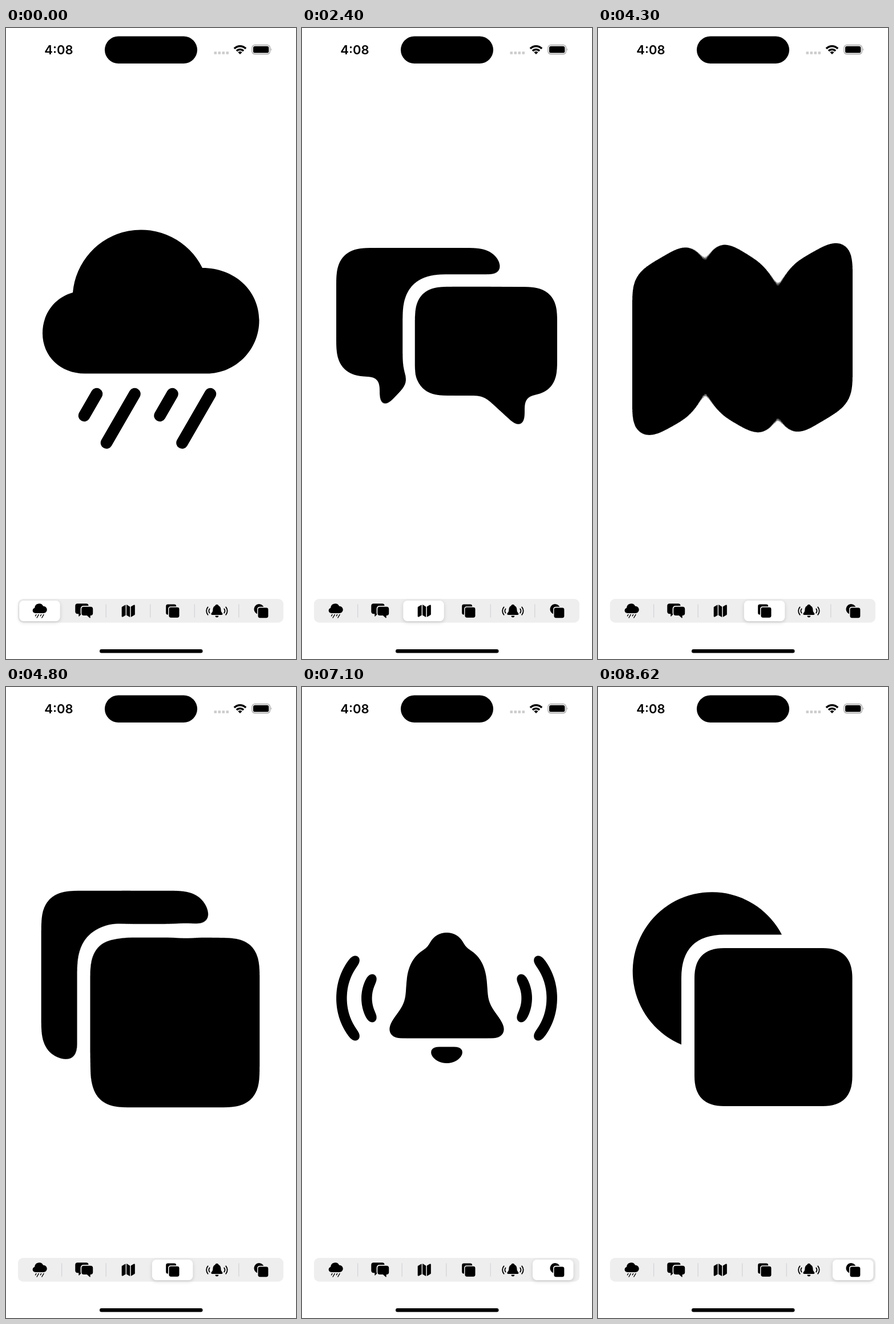
An HTML page for the animation above (8740 ms loop, 508 px wide and 1102 px high).

```html
<!DOCTYPE html>
<html lang="en">
<head>
<meta charset="utf-8">
<title>Icon morph</title>
<style>
  html, body { margin: 0; width: 100%; height: 100%; overflow: hidden; background: #fff; }
  svg { display: block; width: 508px; height: 1102px; }
  .line { fill: none; stroke: #000; stroke-linecap: round; }
  #time { font: 600 22px Inter, "Noto Sans", sans-serif; text-anchor: middle; }
  #pill { fill: #fff; filter: drop-shadow(0 2px 3px rgba(0, 0, 0, .16)); }
</style>
</head>
<body>
<svg viewBox="0 0 508 1102">
  <defs>
    <g id="icon0">
      <path d="M138 603.5C95 603.5 64 573 64 533C64 499 85 471 117 462A120 120 0 0 1 344 419C401 419 443.5 459 443.5 511C443.5 562 402 603.5 352 603.5Z"/>
      <path class="line" stroke-width="20.5" d="M159 639L137 677M225.5 639L176 724.5M291.5 639L269.5 677M358 639L308.5 724.5"/>
    </g>
    <g id="icon1">
      <path d="M112 384H300Q350 384 350 430H247Q176 430 176 501V577Q176 603 186 620L146 662Q136 672 136 656V609H112Q60 609 60 557V436Q60 384 112 384Z"/>
      <path d="M247 452H396Q447 452 447 501V593Q447 642 396 642H390V688Q390 706 376 695L318 642H247Q198 642 198 593V501Q198 452 247 452Z"/>
    </g>
    <g id="icon2">
      <path d="M60 446C60 432 66 426 80 418.5L167 368.5Q175 364 175 373V664Q175 671 169 674L100 712.5C79 724 60 717 60 697Z"/>
      <path d="M200.5 368Q200.5 359 209 363.5L296 416Q302.5 420 302.5 427V716Q302.5 725 295 721L206 671Q200.5 668 200.5 661Z"/>
      <path d="M328 426Q328 418 335 414.5L408 373.5C428 362 446 369 446 391V639C446 651 441 658 430 665L337 719.5Q328 725 328 715Z"/>
    </g>
    <g id="icon3">
      <path d="M358 413.5H202Q124 413.5 124 491.5V652H116.5Q60.5 652 60.5 596V410.5Q60.5 354.5 116.5 354.5H302Q358 354.5 358 410.5Z"/>
      <path d="M204 438H389.5Q445.5 438 445.5 494V679.5Q445.5 735.5 389.5 735.5H204Q148 735.5 148 679.5V494Q148 438 204 438Z"/>
    </g>
    <g id="icon4">
      <path d="M253.5 428.5C237 428.5 225 438 221 455C198 464 185 484 183 516L181.5 538C180 562 160 574 153.5 592C149 604 156 613.5 170 613.5H337C351 613.5 358 604 353.5 592C347 574 327 562 325.5 538L324 516C322 484 309 464 286 455C282 438 270 428.5 253.5 428.5Z"/>
      <path d="M224 637Q223 628.5 231 628.5H276Q284 628.5 283 637C281 649 268 657.5 253.5 657.5S226 649 224 637Z"/>
      <path class="line" stroke-width="18.5" d="M94 476A104 104 0 0 0 94 611M123.5 508A65 65 0 0 0 123.5 579M413 476A104 104 0 0 1 413 611M383.5 508A65 65 0 0 1 383.5 579"/>
    </g>
    <g id="icon5">
      <path d="M322 432.5H222Q146 432.5 146 508V624.5A138.5 138.5 0 1 1 322 432.5Z"/>
      <path d="M221 456H393.5Q445.5 456 445.5 508V680Q445.5 732 393.5 732H221Q169 732 169 680V508Q169 456 221 456Z"/>
    </g>
    <filter id="goo" filterUnits="userSpaceOnUse" x="-40" y="250" width="588" height="600" color-interpolation-filters="sRGB">
      <feGaussianBlur id="blur" stdDeviation="0"/>
      <feComponentTransfer><feFuncA id="threshold" type="linear"/></feComponentTransfer>
    </filter>
  </defs>

  <text id="time" x="92.5" y="46">4:08</text>
  <rect x="173" y="14.5" width="162" height="47.5" rx="23.75"/>
  <path stroke="#ccc" stroke-width="4.6" stroke-dasharray="4.6 2.4" d="M364.5 43.5H390.5"/>
  <g transform="translate(410 46)">
    <path class="line" style="stroke-linecap:butt" stroke-width="3.5" d="M-10.1 -10.1A14.3 14.3 0 0 1 10.1 -10.1M-6.1 -6.1A8.7 8.7 0 0 1 6.1 -6.1"/>
    <path d="M0 0L-3.5 -3.5A5 5 0 0 1 3.5 -3.5Z"/>
  </g>
  <rect x="431" y="29.7" width="31.5" height="16" rx="5" fill="none" stroke="#999" stroke-width="1.2"/>
  <rect x="433" y="31.8" width="27.4" height="11.8" rx="3.2"/>
  <path fill="#999" d="M464 35.3Q466 37.5 464 40Z"/>

  <g id="morph"><use id="current"/><use id="next"/></g>

  <rect x="21" y="997" width="465" height="41.5" rx="9" fill="#eeeeef"/>
  <g id="dividers" fill="#d2d2d5"></g>
  <rect id="pill" y="1000" width="71.5" height="36" rx="7.5"/>
  <g id="tabs"></g>
  <rect x="164" y="1085" width="180.5" height="6.5" rx="3.25"/>
</svg>
<script>
const LOOP = 8740;
const TAPS = [660, 2150, 3800, 5245, 6940];
const RAMP = 650;        // time for the blur to rise, and again to fall
const MAX_BLUR = 25.9;
const STEP = 77.55;      // distance between tabs
const TAB_SCALES = [.066, .08, .06, .0605, .099, .0645];

const $ = id => document.getElementById(id);
const clamp = v => Math.min(1, Math.max(0, v));
const set = (id, attrs) => {
  for (const name in attrs) $(id).setAttribute(name, attrs[name]);
};

$('tabs').innerHTML = TAB_SCALES.map((k, i) =>
  `<use href="#icon${i}" transform="translate(${59.2 + STEP * i} 1018) scale(${k}) translate(-253.5 -543)"/>`).join('');
$('dividers').innerHTML = TAPS.map((_, i) =>
  `<rect x="${97 + STEP * i}" y="1006.5" width="1.2" height="23"/>`).join('');

// Underdamped spring: response 0.7 s, damping fraction 0.8
function fadeSpring(ms) {
  if (ms <= 0) return 0;
  const w = 2 * Math.PI / 700 * ms;
  return clamp(1 - Math.exp(-.8 * w) * (Math.cos(.6 * w) + 4 / 3 * Math.sin(.6 * w)));
}

// Critically damped spring for the selected tab
function slideSpring(ms) {
  const w = Math.max(0, ms) * .025;
  return 1 - Math.exp(-w) * (1 + w);
}

function draw(now) {
  const t = now % LOOP;
  const tab = TAPS.filter(tap => t >= tap).length;
  const from = Math.max(0, tab - 1);
  const age = tab ? t - TAPS[tab - 1] : RAMP * 2;

  // Blur and threshold the cross-fade of both icons
  const mix = fadeSpring(age - RAMP);
  const blur = MAX_BLUR * clamp(1 - Math.abs(age - RAMP) / RAMP);
  const slope = 1 + 2.5 * blur;
  set('current', { href: '#icon' + from, opacity: 1 - mix });
  set('next', { href: '#icon' + tab, opacity: mix });
  set('blur', { stdDeviation: blur });
  set('threshold', { slope, intercept: (1 - slope) / 2 });
  set('morph', { filter: blur ? 'url(#goo)' : 'none' });

  const position = TAPS.reduce((sum, tap) => sum + slideSpring(t - tap), 0);
  set('pill', { x: 23.2 + STEP * position });
  [...$('dividers').children].forEach((line, i) =>
    line.setAttribute('opacity', clamp(Math.abs(position - i - .5) - .5)));

  requestAnimationFrame(draw);
}
draw(performance.now());
</script>
</body>
</html>
```
